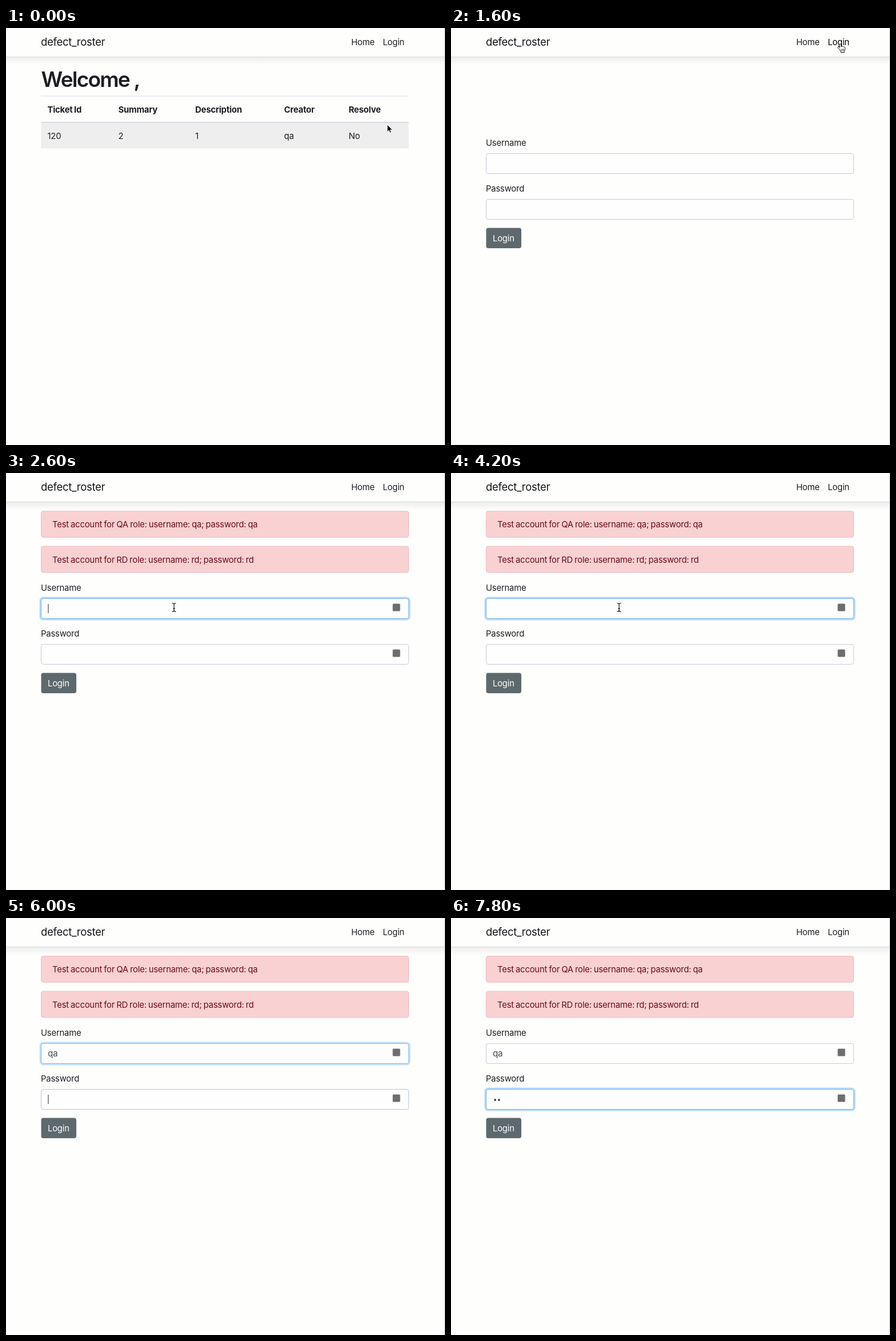
Animation, 768 px wide and 729 px high, one loop 8000 ms. Source, as an HTML page:

```html
<!DOCTYPE html>
<html lang="en">
<head>
<meta charset="utf-8">
<title>Login demo</title>
<style>
  html, body { margin: 0; width: 100%; height: 100%; overflow: hidden; background: #fefefd; }
  svg { display: block; width: 100%; height: 100%; }
  text {
    font: 400 14.85px Inter, "Open Sans", sans-serif;
    font-optical-sizing: none;
    letter-spacing: -.21px;
    word-spacing: -.9px;
    fill: #1c1e22;
    white-space: pre;
  }
  .brand { font-size: 18.5px; letter-spacing: -.3px; fill: #141518; }
  .title { font-size: 37px; font-weight: 600; letter-spacing: -1.75px; word-spacing: 0; }
  .head { font-weight: 700; letter-spacing: -.2px; }
  .alert { fill: #6a0d16; }
  .btn { fill: #fff; }
  .value { fill: #40464d; }
</style>
</head>
<body>
<svg viewBox="0 0 768 729">
  <defs>
    <linearGradient id="shade" x2="0" y2="1">
      <stop stop-color="#000" stop-opacity=".065"/>
      <stop offset="1" stop-color="#000" stop-opacity="0"/>
    </linearGradient>
    <linearGradient id="status">
      <stop stop-color="#000" stop-opacity=".04"/>
      <stop offset="1" stop-color="#000" stop-opacity="0"/>
    </linearGradient>
  </defs>
  <rect width="768" height="729" fill="#fefefd"/>
  <g id="home"></g>
  <g id="form"></g>
  <g id="alerts"></g>
  <rect id="hint" y="727" width="156" height="2" fill="url(#status)"/>
  <g id="nav"></g>
  <g id="cursor">
    <path id="arrow" d="M0 0V12.6L2.9 9.9L4.9 14.4L7 13.5L5.1 9.1H9Z" fill="#000" stroke="#fff" stroke-width=".9"/>
    <g id="hand" stroke="#111" stroke-width="1" stroke-linejoin="round" stroke-linecap="round">
      <path d="M-.9 10.2L-3.9 7.2C-5 5.9-3.5 4.6-2.2 5.6L-.9 6.8L-1.7 1.6C-1.9-.1 .3-.5 .8 1.2L1.7 5.1C1.9 3.9 4 3.9 4.2 5.4C4.7 4.4 6.3 4.7 6.5 5.9C7.4 5.2 8.5 5.9 8.5 7.1C8.6 9.8 8.1 11.2 7.2 12.8V15.2H.9V13.3Z" fill="#fff"/>
      <path d="M2 9.2L2.3 12.4M4.2 9.2V12.4M6.1 9.2L5.9 12.4" fill="none" stroke-width=".8"/>
    </g>
    <path id="beam" d="M-3.3-7.3Q-.6-7.3 0-5.8Q.6-7.3 3.3-7.3M0-5.8V5.8M-3.3 7.3Q-.6 7.3 0 5.8Q.6 7.3 3.3 7.3M-1.7 1.8H1.7" fill="none" stroke="#111" stroke-width="1.2"/>
  </g>
</svg>
<script>
const LOOP = 8000, STEP = 200;
const $ = id => document.getElementById(id);

function add(parent, tag, attrs, content = '') {
  const el = document.createElementNS('http://www.w3.org/2000/svg', tag);
  for (const key in attrs) el.setAttribute(key, attrs[key]);
  el.textContent = content;
  return parent.appendChild(el);
}
const text = (parent, x, y, content, cls = '') => add(parent, 'text', { x, y, class: cls }, content);
const rect = (parent, x, y, width, height, fill, more) =>
  add(parent, 'rect', { x, y, width, height, fill, ...more });
const show = (el, on) => el.setAttribute('visibility', on ? 'visible' : 'hidden');

// Navigation bar and window edge
const nav = $('nav');
rect(nav, 0, 51, 767, 14, 'url(#shade)');
rect(nav, 0, 50, 767, 1, '#d9dadc');
rect(nav, 767, 0, 1, 729, '#c6c6c6');
text(nav, 61, 30.5, 'defect_roster', 'brand');
text(nav, 604, 30, 'Home');
const loginLink = text(nav, 659.2, 30, 'Login');

// Ticket list
const home = $('home');
text(home, 61.5, 103, 'Welcome ,', 'title');
rect(home, 61.5, 118.5, 643, 1, '#dcdfe2');
rect(home, 61.5, 164, 643, 2, '#d9dce1');
rect(home, 61.5, 166, 643, 44.5, '#eeeeee');
const columns = [
  [72.5, 'Ticket Id', '120'], [196.5, 'Summary', '2'], [331, 'Description', '1'],
  [486.5, 'Creator', 'qa'], [599.5, 'Resolve', 'No']
];
for (const [x, label, value] of columns) {
  text(home, x, 147.5, label, 'head');
  text(home, x, 194, value);
}

// Login form
const form = $('form');
function field(y, label) {
  text(form, 61, y - 13.5, label);
  const ring = rect(form, 60, y - 1.5, 646, 38, 'none', { rx: 5, stroke: '#b5dbfb', 'stroke-width': 3 });
  const box = rect(form, 61.5, y, 643, 35, '#fefefe', { rx: 3.8 });
  const icon = rect(form, 676.5, y + 9, 13, 13, '#6d6d6d', { rx: 1.5 });
  const caret = rect(form, 73.5, y + 9.5, 1, 16, '#222');
  return { ring, box, icon, caret };
}
const user = field(219.5, 'Username');
const pass = field(299.5, 'Password');
const userText = text(form, 73.3, 242.3, '', 'value');
const dots = [77.2, 84].map(cx => add(form, 'circle', { cx, cy: 318, r: 1.9, fill: '#3c4147' }));
rect(form, 61.5, 349.5, 61.5, 35.5, '#5e696d', { rx: 3.8 });
text(form, 73, 373, 'Login', 'btn');

// Notices
const alerts = $('alerts');
[['QA', 'qa', 66.5], ['RD', 'rd', 128]].forEach(([role, name, y]) => {
  rect(alerts, 61.5, y, 643, 46, '#f9d1d3', { rx: 3.8, stroke: '#f1bdc2' });
  text(alerts, 81, y + 28.7, `Test account for ${role} role: username: ${name}; password: ${name}`, 'alert');
});

// Pointer stops: time, x, y
const path = [
  [0, 667, 169], [400, 669, 148], [800, 679, 62], [1200, 682, 28], [1600, 681, 27.5],
  [1800, 637, 44.5], [2000, 500, 125], [2200, 345, 221], [2400, 294, 235], [LOOP, 294, 235]
];
function pointer(t) {
  const i = path.findIndex(p => p[0] > t);
  const [t0, x0, y0] = path[i - 1], [t1, x1, y1] = path[i];
  const k = (t - t0) / (t1 - t0);
  return [x0 + (x1 - x0) * k, y0 + (y1 - y0) * k];
}

const mix = (a, b, k) => `rgb(${a.map((v, i) => Math.round(v + (b[i] - v) * k))})`;
function focus(f, k) {
  f.ring.setAttribute('opacity', Math.max(0, k * 1.3 - .3));
  f.box.setAttribute('stroke', mix([198, 203, 213], [114, 180, 232], k));
}
const blink = (t, since) => (t - since) % 1000 < 500;
function caret(f, on, x) {
  show(f.caret, on);
  f.caret.setAttribute('x', x);
}

function draw(now) {
  const t = Math.floor(now % LOOP / STEP) * STEP;
  const onForm = t >= 1600, tab = 6000;

  show(home, !onForm);
  form.style.display = onForm ? '' : 'none';
  show(alerts, t >= 1800);
  show($('hint'), t >= 1200 && t < 2000);
  loginLink.style.fill = t >= 1200 && t < 2000 ? '#000' : '';

  focus(user, t < 2600 || t > tab ? 0 : t === tab ? .85 : 1);
  focus(pass, t < tab ? 0 : t === tab ? .23 : 1);
  show(user.icon, t >= 2000);
  show(pass.icon, t >= 2000);

  const typed = t < 5000 ? 0 : t < 5400 ? 1 : 2;
  userText.textContent = 'qa'.slice(0, typed);
  caret(user, t >= 2600 && t < tab && blink(t, [2600, 5000, 5400][typed]), [73.5, 82.5, 91][typed]);

  const hidden = t < 6600 ? 0 : t < 7000 ? 1 : 2;
  dots.forEach((d, i) => show(d, i < hidden));
  caret(pass, t >= tab && blink(t, [tab, 6600, 7000][hidden]), [73.5, 81, 88][hidden]);

  const [x, y] = pointer(t);
  const shape = t >= 2200 ? 'beam' : t >= 1000 && t < 2000 ? 'hand' : 'arrow';
  for (const id of ['arrow', 'hand', 'beam']) $(id).style.display = id === shape ? '' : 'none';
  show($('cursor'), t < 5000);
  $('cursor').setAttribute('transform', `translate(${x} ${y})`);
}

const start = performance.now();
function tick() {
  draw(performance.now() - start);
  requestAnimationFrame(tick);
}
tick();
</script>
</body>
</html>
```
